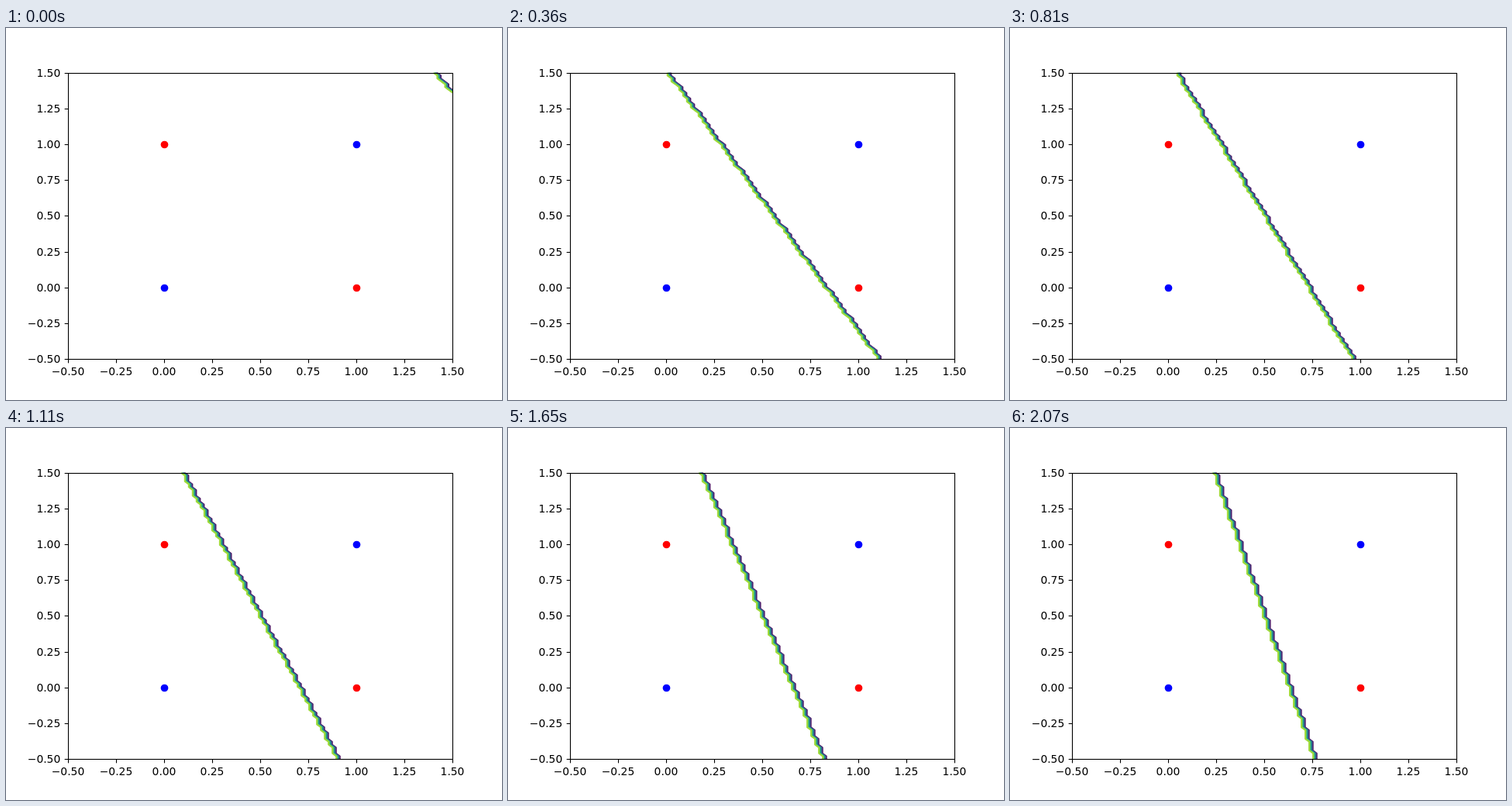
Write an HTML page with a canvas that moves like this. It is 640 by 480 pixels and loops after 2.1 s.

```html
<!DOCTYPE html>
<html lang="en">
<head>
<meta charset="utf-8">
<title>Decision boundary</title>
<style>
  html, body { margin: 0; width: 100%; height: 100%; overflow: hidden; background: #fff; }
  canvas { display: block; width: 640px; height: 480px; }
</style>
</head>
<body>
<canvas id="plot" width="640" height="480"></canvas>
<script>
const ctx = document.getElementById('plot').getContext('2d');
const PT = 100 / 72;                      // pixels per point
const LEFT = 80, RIGHT = 576, TOP = 57.6, BOTTOM = 427.2;
const STEP_MS = 30, STEPS = 70;
const CELLS = 99;                         // grid cells per side
const COLORS = ['#440154', '#46327e', '#365c8d', '#277f8e', '#1fa187', '#4ac16d', '#a0da39'];

const px = x => LEFT + (x + 0.5) / 2 * (RIGHT - LEFT);
const py = y => BOTTOM - (y + 0.5) / 2 * (BOTTOM - TOP);
const colX = c => LEFT + c * (RIGHT - LEFT) / CELLS;
const rowY = n => TOP + n * (BOTTOM - TOP) / CELLS;
const snap = v => Math.round(v) + 0.5;

function line(x0, y0, x1, y1) {
  ctx.beginPath();
  ctx.moveTo(x0, y0);
  ctx.lineTo(x1, y1);
  ctx.stroke();
}

function dot(x, y, color) {
  ctx.fillStyle = color;
  ctx.beginPath();
  ctx.arc(snap(px(x)), snap(py(y)), 3.5 * PT, 0, Math.PI * 2);
  ctx.fill();
}

function axes() {
  const l = snap(LEFT), r = snap(RIGHT), t = snap(TOP), b = snap(BOTTOM), tick = 3.5 * PT;
  ctx.strokeStyle = ctx.fillStyle = '#000';
  ctx.lineWidth = 0.8 * PT;
  ctx.lineJoin = 'miter';
  ctx.strokeRect(l, t, r - l, b - t);
  ctx.font = 10 * PT + 'px "DejaVu Sans", sans-serif';
  ctx.textBaseline = 'alphabetic';
  for (let i = 0; i <= 8; i++) {
    const v = -0.5 + i * 0.25;
    const label = v.toFixed(2).replace('-', '\u2212');
    const x = px(v), y = py(v);
    line(snap(x), b, snap(x), b + tick);
    line(l, snap(y), l - tick, snap(y));
    ctx.textAlign = 'center';
    ctx.fillText(label, x, 448);
    ctx.textAlign = 'right';
    ctx.fillText(label, LEFT - 2 * tick, Math.round(y + 5.07));
  }
}

// Boundary x = mid - lean * (y - 0.5) after k training steps
function boundary(k) {
  return {
    mid: 0.505 + 1.54 * Math.exp(-0.276 * k),
    lean: Math.exp(-0.5396 - 0.01222 * (k - 7) - 0.0000221 * (k - 7) * (k - 37))
  };
}

// Level line between ones on the left and zeros on the right of the grid
function contour(cellAt, level) {
  ctx.beginPath();
  let cell = cellAt(0);
  ctx.moveTo(colX(cell + 1 - level), rowY(0));
  for (let n = 1; n <= CELLS; n++) {
    const next = cellAt(n);
    if (next > cell) ctx.lineTo(colX(next), rowY(n - 1 + level));
    if (next >= CELLS) break;
    ctx.lineTo(colX(next + 1 - level), rowY(n));
    cell = next;
  }
  ctx.stroke();
}

function contours(k) {
  const { mid, lean } = boundary(k);
  const cellAt = n => Math.floor((mid - lean + 0.5) * CELLS / 2 + lean * n);
  ctx.save();
  ctx.beginPath();
  ctx.rect(LEFT, TOP, RIGHT - LEFT, BOTTOM - TOP);
  ctx.clip();
  ctx.lineWidth = 1.5 * PT;
  ctx.lineJoin = 'round';
  COLORS.forEach((color, i) => {
    ctx.strokeStyle = color;
    contour(cellAt, i * 0.15);
  });
  ctx.restore();
}

function draw(k) {
  ctx.fillStyle = '#fff';
  ctx.fillRect(0, 0, 640, 480);
  dot(0, 0, '#00f');
  dot(1, 1, '#00f');
  dot(0, 1, '#f00');
  dot(1, 0, '#f00');
  contours(k);
  axes();
}

const start = performance.now();
function tick() {
  draw(Math.floor(Math.max(0, performance.now() - start) / STEP_MS) % STEPS);
  requestAnimationFrame(tick);
}
tick();
</script>
</body>
</html>
```
